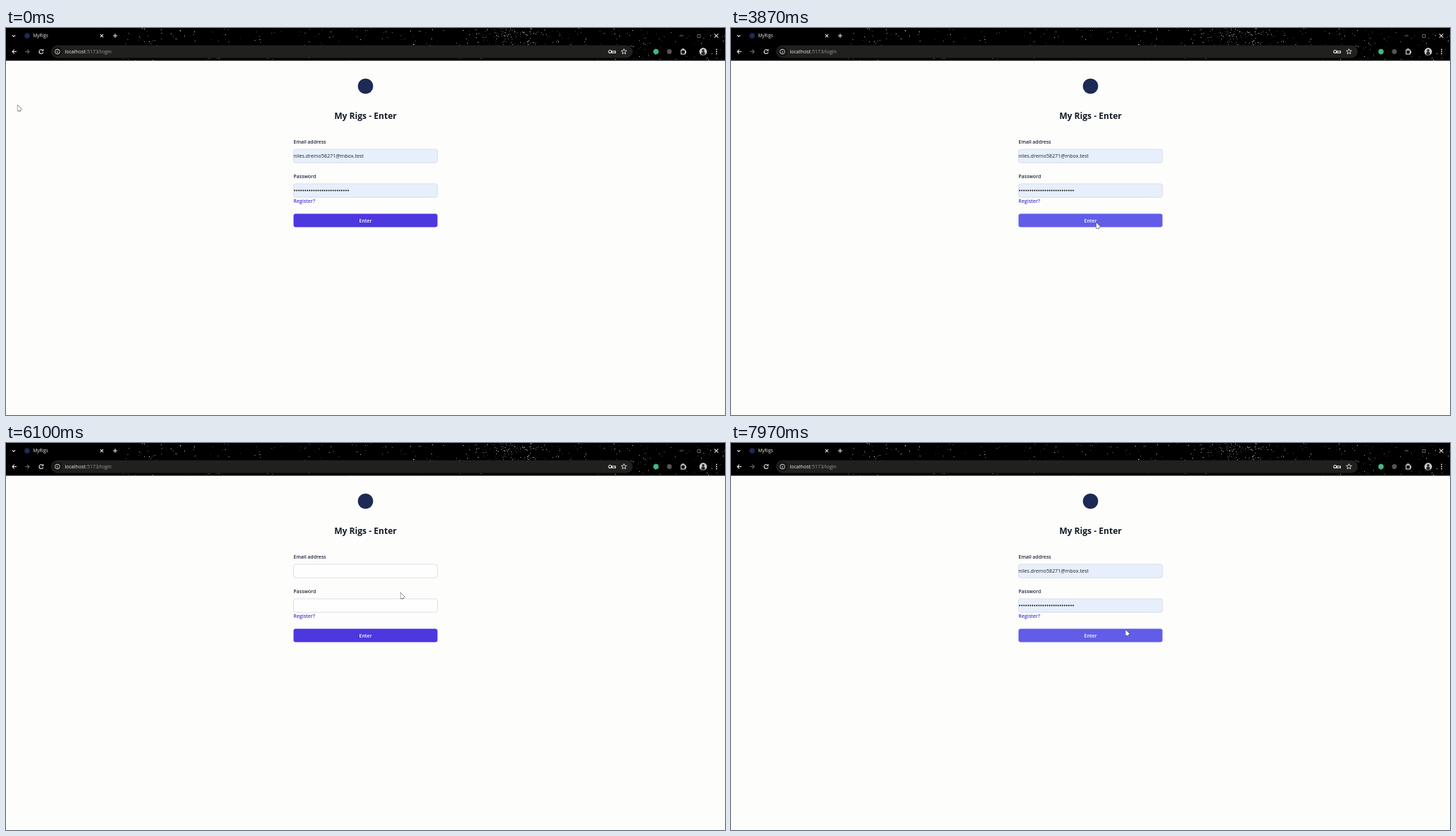
Write an HTML page with a canvas that moves like this. It is 1021x549 px and loops after 8000 ms.

```html
<!DOCTYPE html>
<html lang="en">
<head>
<meta charset="utf-8">
<title>Login</title>
<style>
  html, body { margin: 0; width: 100%; height: 100%; overflow: hidden; background: #fdfdfc; }
  canvas { display: block; }
</style>
</head>
<body>
<canvas id="stage" width="1021" height="549"></canvas>
<script>
const ctx = document.getElementById('stage').getContext('2d');
const W = 1021, H = 549, BAR = 46.4, LOOP = 8000, TAU = Math.PI * 2;
const FONT = '"Open Sans", "Noto Sans", sans-serif';
const LEFT = 408.3, WIDTH = 204.4, HEIGHT = 19.2, MID = W / 2;
const EMAIL_Y = 172, PASS_Y = 221, BUTTON_Y = 263.4;
const NAVY = '#1d2a55', LIGHT = '#e6e6e6', DIM = '#6a6a6a', INK = '#20283a';
const RELOAD = { x: 50, y: 33.5 };

// Pointer stops: arrival time and place
const stop = (at, x, y) => ({ at, x, y });
const STOPS = [
  stop(0, 16, 109),
  stop(500, 556, 284),
  stop(1360, 563, 334),
  stop(2370, 541, 313),
  stop(2830, 522, 312.5),
  stop(3430, 520, 292),
  stop(3930, 514, 234),
  stop(4870, 514, 283),
  stop(5480, 44, 30),
  stop(5900, 560, 212),
  stop(6500, 588, 184),
  stop(6800, 586, 195),
  stop(7470, 560, 206),
  stop(7970, 560, 264.5)
];

function random(seed) {
  return () => (seed = (seed * 16807) % 2147483647) / 2147483647;
}

// Even scatter plus a denser cloud around x = 722
const rnd = random(4127);
const stars = Array.from({ length: 480 }, (_, i) => {
  const cloud = i % 4 === 0;
  const x = cloud ? 722 + (rnd() + rnd() - 1) * 75 : 160 + (W - 160) * rnd();
  return { x: Math.floor(x), y: Math.floor(rnd() * (cloud ? 24 : BAR)), glow: 0.2 + 0.8 * rnd() ** 2 };
});

// Each move takes longer the farther it goes and ends on its stop
function pointerAt(t) {
  let { x, y } = STOPS[0];
  STOPS.slice(1).forEach((to, i) => {
    const from = STOPS[i];
    const span = 50 + 0.7 * Math.hypot(to.x - from.x, to.y - from.y);
    const p = Math.min(1, Math.max(0, 1 + (t - to.at) / span));
    const e = p * p * (3 - 2 * p);
    x += (to.x - from.x) * e;
    y += (to.y - from.y) * e;
  });
  return { x, y };
}

function text(str, x, y, size, color, weight = 400, align = 'left') {
  ctx.font = `${weight} ${size}px ${FONT}`;
  ctx.textAlign = align;
  ctx.fillStyle = color;
  ctx.fillText(str, x, y);
}

function disc(x, y, r, color) {
  ctx.fillStyle = color;
  ctx.beginPath();
  ctx.arc(x, y, r, 0, TAU);
  ctx.fill();
}

function ring(x, y, r, from = 0, to = TAU) {
  ctx.beginPath();
  ctx.arc(x, y, r, from, to);
  ctx.stroke();
}

function pen(color, width = 1.1) {
  ctx.strokeStyle = color;
  ctx.lineWidth = width;
}

function line(x, y, dx, dy) {
  ctx.beginPath();
  ctx.moveTo(x, y);
  ctx.lineTo(x + dx, y + dy);
  ctx.stroke();
}

function box(x, y, w, h, r, fill) {
  ctx.beginPath();
  ctx.roundRect(x, y, w, h, r);
  ctx.fillStyle = fill;
  ctx.fill();
}

function cross(x, y, r) {
  line(x - r, y - r, 2 * r, 2 * r);
  line(x - r, y + r, 2 * r, -2 * r);
}

function plus(x, y, r) {
  line(x - r, y, 2 * r, 0);
  line(x, y - r, 0, 2 * r);
}

// Corner at (x, y) with arms running toward angle a
function chevron(x, y, r, a) {
  const arm = d => [x + r * Math.cos(a + d), y + r * Math.sin(a + d)];
  ctx.beginPath();
  ctx.moveTo(...arm(Math.PI / 4));
  ctx.lineTo(x, y);
  ctx.lineTo(...arm(-Math.PI / 4));
  ctx.stroke();
}

function starIcon(x, y) {
  ctx.beginPath();
  for (let i = 0; i < 10; i++) {
    const a = i * TAU / 10 - TAU / 4, r = i % 2 ? 1.8 : 4;
    ctx.lineTo(x + r * Math.cos(a), y + r * Math.sin(a));
  }
  ctx.closePath();
  ctx.stroke();
}

function drawTabs() {
  ctx.fillStyle = '#000';
  ctx.fillRect(0, 0, W, BAR);
  for (const s of stars) {
    ctx.fillStyle = `rgba(240,240,240,${s.glow})`;
    ctx.fillRect(s.x, s.y, 1, 1);
  }
  const y = 11;
  disc(30, y, 3.8, NAVY);
  text('MyRigs', 38.4, y + 2.4, 6.5, LIGHT);
  pen(LIGHT);
  chevron(11, y + 1.2, 3, -TAU / 4);
  cross(136, y, 2.1);
  plus(155, y, 3);
  cross(1008.7, y, 2.7);
  pen(DIM, 1);
  line(956.5, y, 5.5, 0);
  ctx.strokeRect(982, y - 1.5, 4, 4);
}

function drawToolbar(hover, loading) {
  const { x, y } = RELOAD;
  pen(LIGHT);
  line(9, y, 6, 0);
  chevron(9, y, 4, 0);
  pen(DIM);
  line(27, y, 6, 0);
  chevron(33, y, 4, TAU / 2);

  if (hover) disc(x, y, 8.3, '#3b3b3b');
  pen(LIGHT);
  ring(x, y, 2.9, 0.3, 5.4);
  chevron(x + 2.9, y - 1.2, 2.4, TAU * 5 / 8);

  box(64, y - 9, 826, 18, 9, '#20211f');
  disc(73, y, 6.6, '#141512');
  pen(LIGHT, 0.9);
  ring(73, y, 3.4);
  line(73, y - 0.5, 0, 2.4);
  line(73, y - 2.1, 0, 0.8);
  starIcon(877.5, y);

  const host = 'localhost';
  text(host, 83.4, y + 2.7, 7.1, '#e8e8e8');
  text(':5173/login', 83.4 + ctx.measureText(host).width, y + 2.7, 7.1, '#989898');

  pen(LIGHT);
  ring(857.8, y, 2);
  ctx.strokeRect(860.5, y - 0.6, 5, 2.4);

  disc(923, y, 3.8, loading ? '#858585' : '#3fb984');
  disc(942, y, 3.4, '#555');

  ctx.strokeRect(958.7, y - 2.3, 5.6, 5.8);
  ring(961.4, y - 2.6, 1.3, TAU / 2, TAU);
  ring(964.4, y + 0.5, 1.3, -TAU / 4, TAU / 4);

  disc(990, y, 5.4, '#c9cbc9');
  disc(990, y - 1.8, 1.8, '#292929');
  disc(990, y + 2.4, 2.6, '#292929');
  for (let i = -1; i <= 1; i++) disc(1009, y + i * 3, 0.9, LIGHT);
}

function drawField(label, y, filled, focused) {
  text(label, LEFT, y - 8, 6.9, INK, 600);
  box(LEFT, y, WIDTH, HEIGHT, 3, filled ? '#e7effc' : '#fefefe');
  pen(focused ? '#17104e' : '#d3d7dc', focused ? 1.6 : 0.8);
  ctx.stroke();
}

function drawForm(filled, focused, hover) {
  disc(MID, 82.5, 10.8, NAVY);
  text('My Rigs - Enter', MID, 129.3, 12.1, '#151b28', 700, 'center');
  drawField('Email address', EMAIL_Y, filled, focused);
  drawField('Password', PASS_Y, filled, false);
  if (filled) {
    text('niles.dremo58271@mbox.test', LEFT, EMAIL_Y + 12.1, 7.15, '#202124');
    for (let i = 0; i < 26; i++) disc(409.9 + i * 3.04, PASS_Y + 9.6, 1, '#111');
  }
  text('Register?', LEFT, 247.9, 7, '#4b3bd2', 600);
  box(LEFT, BUTTON_Y, WIDTH, HEIGHT, 3, hover ? '#625de8' : '#4d37df');
  text('Enter', MID, BUTTON_Y + 12.2, 6.9, '#fff', 600, 'center');
}

function drawBeam(x, y) {
  pen('#222', 0.9);
  line(x, y - 4, 0, 8);
  for (const end of [-4, 4]) line(x - 1.8, y + end, 3.6, 0);
}

// Arrow head with a short tail, outlined in dark
function drawArrow(x, y) {
  const tail = (color, width) => {
    pen(color, width);
    line(x + 2.4, y + 5.5, 1.6, 3.8);
  };
  tail('#2a2a2a', 2.5);
  ctx.beginPath();
  ctx.moveTo(x + 0.4, y + 0.4);
  ctx.lineTo(x + 0.4, y + 8.8);
  ctx.lineTo(x + 6.2, y + 6.4);
  ctx.closePath();
  pen('#2a2a2a', 0.9);
  ctx.stroke();
  ctx.fillStyle = '#fff';
  ctx.fill();
  tail('#fff', 1.1);
}

function draw(t) {
  const { x, y } = pointerAt(t);
  const over = (top, height) => x >= LEFT && x <= LEFT + WIDTH && y >= top && y < top + height;
  const loading = t >= 5540 && t < 5740;
  const filled = t < 5540 || t >= 7320;
  const focused = t >= 6440 && t < 7700;

  ctx.fillStyle = '#fdfdfc';
  ctx.fillRect(0, 0, W, H);
  drawTabs();
  drawToolbar(Math.hypot(x - RELOAD.x, y - RELOAD.y) < 9, loading);
  drawForm(filled, focused, over(BUTTON_Y, HEIGHT));
  const beam = over(EMAIL_Y, 25) || over(PASS_Y, HEIGHT);
  (beam ? drawBeam : drawArrow)(x, y);
}

function frame() {
  draw(performance.now() % LOOP);
  requestAnimationFrame(frame);
}
frame();
</script>
</body>
</html>
```
